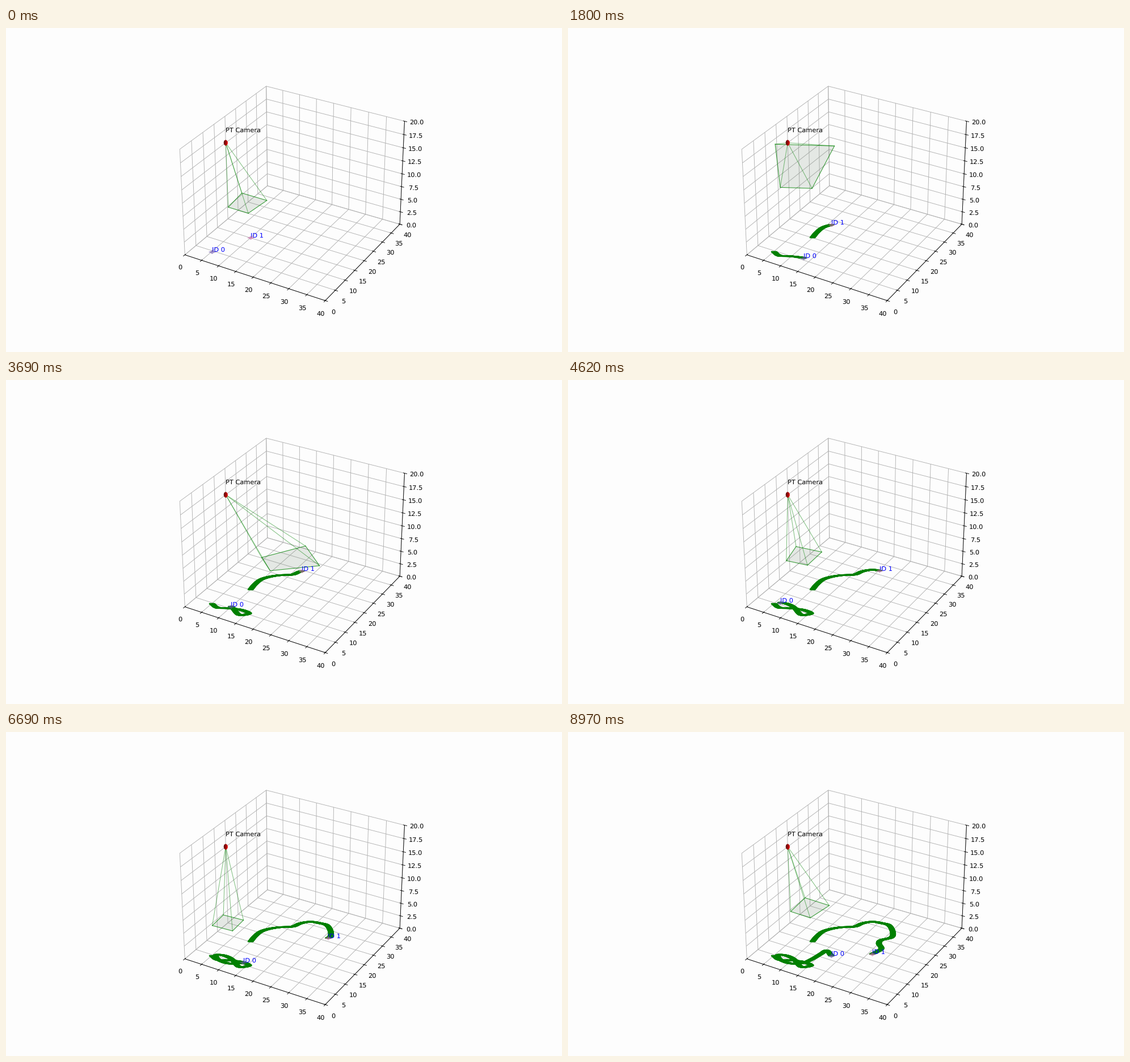
A matplotlib script for the animation above (9 s loop, 980 by 572 pixels).

```python
import matplotlib.pyplot as plt
import numpy as np
from matplotlib.animation import FuncAnimation
from mpl_toolkits.mplot3d.art3d import Line3DCollection, Poly3DCollection

W, H, DPI = 980, 572, 80
FRAMES, INTERVAL = 300, 30
CAM = np.array([0.0, 20.0, 15.0])
HALF_FOV = 0.2  # tangent of the half opening angle

plt.rcParams.update({"font.family": "DejaVu Sans", "font.size": 10.2,
                     "text.hinting": "none"})
fig = plt.figure(figsize=(W / DPI, H / DPI), dpi=DPI, facecolor="#fdfdfd")
ax = fig.add_subplot(projection="3d", computed_zorder=False, facecolor="none")
ax.set(xlim=(0, 40), ylim=(0, 40), zlim=(0, 20))
for axis in (ax.xaxis, ax.yaxis, ax.zaxis):
    axis.set_pane_color((1, 1, 1, 0))
ax.apply_aspect()

# Key points on the stage, evenly spaced in time
WALK_0 = [(363, 395), (373, 402), (393, 403), (415, 406),
          (428, 412), (411, 414.5), (398.5, 401.5), (385.5, 395),
          (371, 393.5), (373, 401), (392, 408.5), (414.5, 407.5),
          (431, 400.5), (446, 391.5), (456, 386), (464, 395)]
WALK_1 = [(431, 370), (438.5, 361), (449, 352.5), (464, 347.5),
          (484, 344.5), (505, 343.5), (518.5, 338), (536, 335),
          (553, 337.5), (566, 341.5), (572.5, 353), (570, 362.5),
          (552, 367.5), (548, 373.5), (552, 383), (536, 392)]

ACROSS = np.array([np.cos(np.pi / 6), 0.5, 0])  # floor direction level on screen
AWAY = np.array([-0.5, np.cos(np.pi / 6), 0])


def to_floor(points):
    """Stage pixels to x, y, 0 on the floor."""
    px, py = np.array(points, float).T
    flat = ax.transData.inverted().transform(np.column_stack([px, H - py]))
    keep = [0, 1, 3]
    back = np.linalg.inv(ax.get_proj()[np.ix_(keep, keep)])
    x, y, w = back @ np.vstack([flat.T, np.ones(len(flat))])
    return np.column_stack([x / w, y / w, 0 * w])


def smooth(points):
    """Cubic curve through evenly timed points, one sample per frame."""
    slope = np.gradient(points, axis=0)
    t = np.linspace(0, len(points) - 1, FRAMES)
    k = np.minimum(t.astype(int), len(points) - 2)
    s = (t - k)[:, None]
    return ((1 + 2 * s) * (1 - s) ** 2 * points[k]
            + s * (1 - s) ** 2 * slope[k]
            + s * s * (3 - 2 * s) * points[k + 1]
            + s * s * (s - 1) * slope[k + 1])


def add(collection):
    ax.add_collection3d(collection)
    return collection


class Walker:
    angle = np.arange(8)[:, None] * np.pi / 4
    radius = np.where(np.arange(8)[:, None] % 2, 0.5, 0.88)
    star = radius * (np.cos(angle) * ACROSS + np.sin(angle) * AWAY)

    def __init__(self, name, walk, color):
        self.path = smooth(to_floor(walk))
        a, b = self.path - 0.58 * ACROSS, self.path + 0.58 * ACROSS
        self.strip = np.stack([a[:-1], a[1:], b[1:], b[:-1]], 1)
        self.trail = add(Poly3DCollection(
            self.strip[:1], facecolor="green", edgecolor="green",
            lw=2.3, joinstyle="round", zorder=2))
        self.body = add(Poly3DCollection(
            [self.star], facecolor=color + (0.6,), edgecolor=color + (0.35,),
            lw=0.6, zorder=4))
        self.label = ax.text(0, 0, 0, name, color="blue", zorder=3)

    def update(self, i):
        self.trail.set_visible(i > 0)
        self.trail.set_verts(self.strip[:max(i, 1)])
        self.body.set_verts([self.path[i] + self.star])
        self.label.set_position_3d(self.path[i])


def footprint(i):
    """Where the four corner rays of the camera meet the floor."""
    a = 2 * np.pi * i / FRAMES
    pan = np.radians(90 + 45 * np.sin(2 * a))
    tilt = np.radians(60 - 30 * np.sin(a))
    c, s = np.cos(pan), np.sin(pan)
    axis = np.array([c * np.cos(tilt), s * np.cos(tilt), -np.sin(tilt)])
    right = np.array([s, -c, 0])
    up = np.cross(right, axis)
    rays = [axis + HALF_FOV * (u * right + v * up)
            for u, v in ((-1, -1), (-1, 1), (1, 1), (1, -1))]
    return np.array([CAM - ray * CAM[2] / ray[2] for ray in rays])


def segments(corners):
    return ([(CAM, p) for p in corners],
            list(zip(corners, np.roll(corners, -1, axis=0))))


u, v = np.meshgrid(np.linspace(0, 2 * np.pi, 17), np.linspace(0, np.pi, 9))
ax.plot_surface(CAM[0] + 0.5 * np.cos(u) * np.sin(v),
                CAM[1] + 0.5 * np.sin(u) * np.sin(v),
                CAM[2] + 0.5 * np.cos(v), color="red", zorder=5)
ax.text(CAM[0], CAM[1], CAM[2] + 2, "PT Camera", color="black", zorder=3)

start = footprint(0)
ray_lines, edge_lines = segments(start)
view = add(Poly3DCollection([start], facecolor=(0.4, 0.5, 0.4, 0.16),
                            edgecolor="none", zorder=2.3))
rays = add(Line3DCollection(ray_lines, colors=[(0, 0.5, 0, 0.5)],
                            lw=0.9, zorder=2.4))
edges = add(Line3DCollection(edge_lines, colors=[(0, 0.5, 0, 0.75)],
                             lw=1, capstyle="projecting", zorder=2.5))
walkers = [Walker("ID 0", WALK_0, (0.42, 0.32, 0.68)),
           Walker("ID 1", WALK_1, (0.78, 0.4, 0.66))]


def update(i):
    corners = footprint(i)
    ray_lines, edge_lines = segments(corners)
    view.set_verts([corners])
    rays.set_segments(ray_lines)
    edges.set_segments(edge_lines)
    for walker in walkers:
        walker.update(i)
    return []


anim = FuncAnimation(fig, update, frames=FRAMES, interval=INTERVAL,
                     init_func=lambda: update(0), repeat=True, repeat_delay=0)
plt.show()
```
